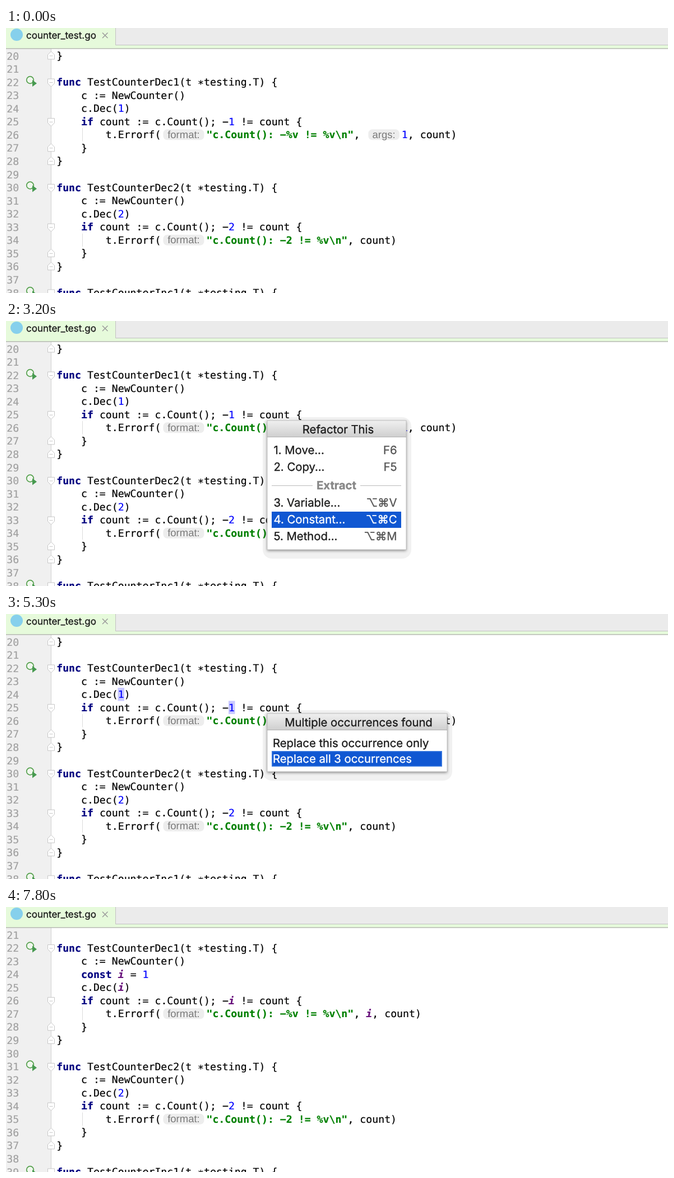
Recreate the animation shown at these times as an HTML page. Size 1181 by 474 pixels, loop 8 s.

```html
<!DOCTYPE html>
<html lang="en">
<head>
<meta charset="utf-8">
<title>Extract constant</title>
<style>
  html, body { margin: 0; width: 100%; height: 100%; overflow: hidden; background: #fff; }
  svg { display: block; }
  text { white-space: pre; text-rendering: geometricPrecision; fill: currentColor; }
  .code { font: 18.2px "DejaVu Sans Mono", monospace; color: #000; stroke: currentColor; stroke-width: .2; }
  .key { font-weight: bold; color: #000080; }
  .num { color: #00f; }
  .str { font-weight: bold; color: #008000; }
  .const { font-weight: bold; font-style: italic; color: #660e7a; }
  .picked { color: #fff; }
  .line { color: #a0a0a0; }
  .hint { font: 18.5px "Liberation Sans", sans-serif; color: #7a7a7a; text-anchor: middle; }
  .ui { font: 20.3px Inter, sans-serif; color: #1c1c1c; stroke: currentColor; stroke-width: .35; }
  .tab { font-size: 17px; }
  .mid { text-anchor: middle; }
  .end { text-anchor: end; color: #555; }
  .group { font-weight: bold; color: #888; }
  .ui.on { color: #fff; }
  .fold { fill: #fff; stroke: #c6c6c6; }
  .box { filter: drop-shadow(0 2px 2.5px rgba(0, 0, 0, .42)); }
</style>
</head>
<body>
<svg width="1181" height="474" viewBox="0 0 1181 474">
  <defs>
    <linearGradient id="bar" x2="0" y2="1">
      <stop stop-color="#f0f0f0"/><stop offset="1" stop-color="#cecece"/>
    </linearGradient>
  </defs>
  <rect width="1181" height="474" fill="#fff"/>
  <rect width="80" height="474" fill="#f0f0f0"/>
  <path d="M80.5 37V474" stroke="#d2d2d2"/>
  <g id="editor"></g>
  <rect width="1181" height="36" fill="#e6fadb"/>
  <rect x="195" width="986" height="31" fill="#ebebeb"/>
  <path d="M195.5 0V30.5H1181" fill="none" stroke="#c2c2c2"/>
  <path d="M0 36.75H1181" stroke="#b6bbb2" stroke-width="1.5"/>
  <circle cx="19" cy="12" r="11" fill="#86d0ec"/>
  <text class="ui tab" x="36" y="19">counter_test.go</text>
  <path d="M172 8.500l9.500 9.500m0-9.500l-9.500 9.500" stroke="#9c9c9c" stroke-width="1.500"/>
  <g id="overlay"></g>
</svg>
<script>
const CHAR = 10.957, ROW = 23.56, LEFT = 90.2, LOOP = 8000;
const hintWidth = { 'format:': 81, 'args:': 63.5 };
const tokens = /("[^"]*"|@\w+:|\b(?:func|if|const)\b|\b\d+\b|\bi\b)/;
const occurrences = [[199.5, 144], [397, 167.4], [705, 191]];

const rect = (x, y, w, h, fill, extra = '') =>
  `<rect x="${x}" y="${y}" width="${w}" height="${h}" fill="${fill}" ${extra}/>`;
const text = (cls, x, y, s) => `<text class="${cls}" x="${x}" y="${y}">${s}</text>`;
const caret = (x, y) => rect(x, y - 12, 2.5, 23.5, '#000');

// The editor font has a wide hyphen and a centred asterisk.
const glyphs = s => s.replace(/-/g, '\u2212').replace(/\*/g, '\u2217');

const testFunc = (name, body) => [`func ${name}(t *testing.T) {`, '    c := NewCounter()', ...body, '    }', '}', ''];

function sourceLines({ inserted, noHint }) {
  const v = inserted ? 'i' : '1';
  const lines = [
    '}', '',
    ...testFunc('TestCounterDec1', [
      ...(inserted ? ['    const i = 1'] : []),
      `    c.Dec(${v})`,
      `    if count := c.Count(); -${v} != count {`,
      `        t.Errorf(@format:"c.Count(): -%v != %v\\n", ${noHint ? '' : '@args:'}${v}, count)`
    ]),
    ...testFunc('TestCounterDec2', [
      '    c.Dec(2)',
      '    if count := c.Count(); -2 != count {',
      '        t.Errorf(@format:"c.Count(): -2 != %v\\n", count)'
    ]),
    'func TestCounterInc1(t *testing.T) {'
  ];
  return inserted ? lines.slice(1) : lines;
}

function tokenClass(token, line, state) {
  if (token[0] === '"') return 'str';
  if (/^(func|if|const)$/.test(token)) return 'key';
  if (/^\d+$/.test(token)) return 'num';
  if (token !== 'i') return '';
  if (state.resolved) return 'const';
  return state.lookup && line.includes('const') ? 'picked' : '';
}

function codeLine(line, base, state) {
  let x = LEFT, out = '';
  for (const token of line.split(tokens)) {
    if (token[0] === '@') {
      const label = token.slice(1), w = hintWidth[label];
      out += rect(x + 4, base - 16, w - 8, 19, '#ededed', 'rx="7"') +
        text('hint', x + w / 2, base - .5, label);
      x += w;
    } else {
      if (token.trim()) out += text('code ' + tokenClass(token, line, state), x, base, glyphs(token));
      x += token.length * CHAR;
    }
  }
  return out;
}

function gutter(line, cy) {
  let out = '';
  if (line.startsWith('func')) {
    out += `<circle cx="43" cy="${cy - 3.5}" r="6.300" fill="#f0f7ed" stroke="#56a04e" stroke-width="1.700"/>
      <path d="M47 ${cy - 3.5}l8 6l-8 6z" fill="#479a50"/>`;
  }
  const opens = /^func|^ +if/.test(line);
  if (opens) out += `<path class="fold" d="M74.500 ${cy - 5.5}h12v8l-6 6l-6-6z"/>`;
  else if (line.trim() === '}') out += `<path class="fold" d="M74.500 ${cy + 6.5}h12v-8l-6-6l-6 6z"/>`;
  else return out;
  return out + `<path class="fold" d="M77.500 ${cy + (opens ? 1 : .5)}h6"/>`;
}

function editor(state) {
  const first = state.inserted ? 21 : 20;
  let out = (state.marks || []).map(i =>
    rect(occurrences[i][0], occurrences[i][1] - 12, 11.5, 23.5, '#c9c9ff')).join('');
  if (state.lookup) out += rect(200, 109, 11, 22.5, '#526da5', 'stroke="#f00" stroke-width="2"');
  sourceLines(state).forEach((line, k) => {
    const base = 56 + ROW * k, cy = base - 6.6;
    out += text('code line', 1.2, base + .5, first + k) + gutter(line, cy);
    if (line.startsWith('        ')) out += rect(136, cy - 11.8, 1, ROW, '#dcdcdc');
    out += codeLine(line, base, state);
  });
  if (state.caret) out += caret(...state.caret);
  return out;
}

const frame = (x, y, w, h, fill) =>
  rect(x - 8, y - 6, w + 17, h + 22, '#000', 'fill-opacity=".055" rx="16"') +
  rect(x, y, w, h, fill, 'class="box"');

// Rows hold: centre below the popup top, label, shortcut.
const popups = {
  refactor: {
    title: 'Refactor This', w: 248, h: 231, bar: 30, rowHeight: 29, inset: 11.5,
    rows: [[53.5, '1. Move...', 'F6'], [83.5, '2. Copy...', 'F5'], [147.5, '3. Variable...', '⌥⌘V'],
      [177.5, '4. Constant...', '⌥⌘C'], [207.5, '5. Method...', '⌥⌘M']],
    group: [116, 'Extract']
  },
  expressions: {
    title: 'Expressions', w: 150, h: 134, bar: 33, rowHeight: 28, inset: 10, flat: true, outlined: true,
    rows: [[55, '1'], [83, '-1'], [111, '-1 != count']]
  },
  multiple: {
    title: 'Multiple occurrences found', w: 321, h: 104, bar: 30, rowHeight: 28, inset: 10, outlined: true,
    rows: [[53, 'Replace this occurrence only'], [81, 'Replace all 3 occurrences']]
  }
};

function selection(x, y, w, h, outlined) {
  return rect(x, y, w, h, '#1057d2') +
    (outlined ? rect(x + .75, y + .75, w - 1.5, h - 1.5, 'none', 'stroke="#3f7de0" stroke-width="1.5"') : '');
}

function popup(name, selected) {
  const p = popups[name], x = 466, y = 178, right = x + p.w;
  let out = frame(x, y, p.w, p.h, '#fff') +
    rect(x, y, p.w, p.bar, p.flat ? '#ececec' : 'url(#bar)') +
    (p.flat ? '' : rect(x, y + p.bar - 1, p.w, 1, '#b0b0b0')) +
    rect(x, y, p.w, p.h, 'none', 'stroke="#b4b4b4" stroke-width=".8"') +
    text('ui mid', x + p.w / 2 + 2.5, y + p.bar / 2 + 7.5, p.title);
  p.rows.forEach(([cy, label, keys], i) => {
    const on = i === selected ? ' on' : '', base = y + cy + 6.8;
    if (on) out += selection(x + 8, y + cy - p.rowHeight / 2, p.w - 17, p.rowHeight, p.outlined);
    out += text('ui' + on, x + p.inset, base, label);
    if (keys) out += text('ui end' + on, right - 16.5, base, keys);
  });
  if (p.group) {
    const [cy, label] = p.group;
    out += text('ui mid group', x + p.w / 2 - .5, y + cy + 7, label) +
      rect(x + 8, y + cy, 73, 1, '#bbb') + rect(right - 82, y + cy, 73, 1, '#bbb');
  }
  return out;
}

const lookup = () => caret(209.5, 120.5) + frame(185, 131.5, 211.5, 29, '#ebf4fe') +
  rect(185, 131.5, 211.5, 29, 'none', 'stroke="#b2b8bf"') + text('code', 200, 152.5, 'i');

const before = { caret: [397, 167.4] };
const after = { inserted: true, caret: [210, 120.5] };
const named = { ...after, resolved: true };
const all = [0, 1, 2];
const timeline = [
  [0, {}], [600, before], [1400, {}], [1800, before],
  [2100, { popup: ['refactor', 0] }], [2900, { popup: ['refactor', 1] }],
  [3100, { popup: ['refactor', 2] }], [3200, { popup: ['refactor', 3] }],
  [3600, before], [3700, { popup: ['expressions', 0], marks: [1] }],
  [4600, before], [4700, { popup: ['multiple', 0], marks: [1] }],
  [5300, { popup: ['multiple', 1], marks: all }],
  [5700, before], [5800, { ...after, marks: all }],
  [5900, { inserted: true, lookup: true, marks: all }],
  [6600, after], [6900, named], [7000, { ...named, noHint: true }],
  [7800, { ...named, noHint: true, caret: null }]
];

const editorLayer = document.getElementById('editor');
const overlayLayer = document.getElementById('overlay');
let shown;

function draw() {
  const t = performance.now() % LOOP;
  const state = timeline.findLast(([start]) => start <= t)[1];
  if (state !== shown) {
    shown = state;
    editorLayer.innerHTML = editor(state);
    overlayLayer.innerHTML = state.popup ? popup(...state.popup) : state.lookup ? lookup() : '';
  }
  requestAnimationFrame(draw);
}
draw();
</script>
</body>
</html>
```
